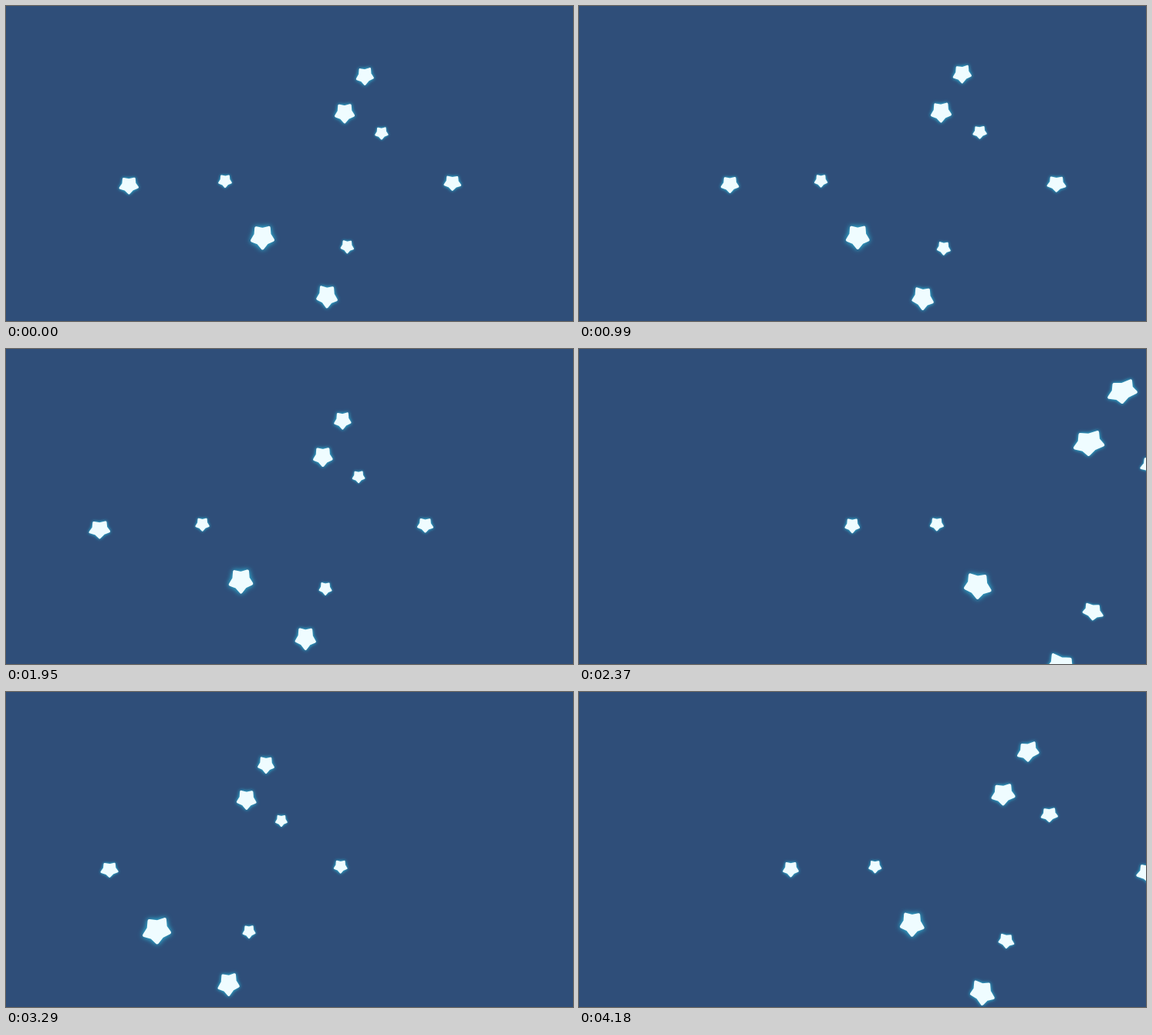
Write an HTML page with a canvas that moves like this. It is 735 by 409 pixels and loops after 4930 ms.

```html
<!DOCTYPE html>
<html lang="en">
<head>
<meta charset="utf-8">
<title>Star panorama</title>
<style>
  html, body { margin: 0; width: 100%; height: 100%; overflow: hidden; background: #2f4e79; }
  canvas { display: block; }
</style>
</head>
<body>
<canvas id="sky" width="735" height="409"></canvas>
<script>
const ctx = document.getElementById('sky').getContext('2d');
const W = 735, H = 409, CX = 366.5, CY = 204.5, FOCAL = 366;
const LOOP = 4930, STEP = 75, RAD = Math.PI / 180;

// Stars fixed on a sphere: longitude (deg), tangent of latitude (down is positive), radius
const stars = [
  [7.4, -0.3, 10.9], [3.5, -0.176, 13], [10.5, -0.103, 8.2],
  [22.4, 0.059, 9], [-37.2, 0.067, 10.2], [-20.4, 0.06, 8.8],
  [-13, 0.259, 15.6], [4, 0.288, 8.4], [0, 0.466, 13]
];

// Key points of the camera sweep: time (ms), yaw (deg)
const sweep = [
  [0, 7.7], [510, 12.8], [600, 16.4], [760, 21.3], [1330, -15.5],
  [1470, -21.3], [1620, -21.3], [1950, 3.4], [2400, 37], [2810, 10],
  [3200, -5], [3290, -12], [3410, -16.2], [3650, -16.2], [4180, 23.1]
];
const last = sweep.length - 1;

const slope = i => (sweep[i + 1][1] - sweep[i][1]) / (sweep[i + 1][0] - sweep[i][0]);

// Harmonic mean of the neighbouring slopes; flat at the start and at turning points
function tangent(i) {
  if (i === 0) return 0;
  if (i === last) return slope(i - 1);
  const a = slope(i - 1), b = slope(i);
  return a * b <= 0 ? 0 : 2 * a * b / (a + b);
}

// Smooth curve through the key points, sampled in even steps between them
function yawAt(t) {
  const i = Math.min(sweep.findLastIndex(key => key[0] <= t), last - 1);
  const [t0, y0] = sweep[i], [t1, y1] = sweep[i + 1];
  const d = t1 - t0, n = Math.round(d / STEP);
  const u = Math.min(1, Math.floor((t - t0) / d * n) / n), v = 1 - u;
  return v * v * ((1 + 2 * u) * y0 + u * d * tangent(i)) +
         u * u * ((3 - 2 * u) * y1 - v * d * tangent(i + 1));
}

// A star lying flat on the sphere, seen in perspective
function starPath(lon, lat, radius) {
  const sl = Math.sin(lon), cl = Math.cos(lon), sp = Math.sin(lat), cp = Math.cos(lat);
  const path = new Path2D();
  for (let k = 0; k < 10; k++) {
    const r = radius / FOCAL * (k % 2 ? 0.58 : 0.87), angle = k * Math.PI / 5;
    const e = r * Math.sin(angle), d = r * Math.cos(angle);
    const x = sl * cp + e * cl - d * sl * sp;
    const y = sp + d * cp;
    const z = cl * cp - e * sl - d * cl * sp;
    path.lineTo(CX + FOCAL * x / z, CY + FOCAL * y / z);
  }
  path.closePath();
  return path;
}

function drawStar(lon, lat, radius) {
  const path = starPath(lon, lat, radius);
  ctx.lineWidth = radius * 0.26 / Math.cos(lon);
  ctx.shadowBlur = radius * 0.45;
  ctx.fill(path);
  ctx.stroke(path);
  ctx.shadowBlur = 0;
  ctx.fill(path);
}

function draw(t) {
  const yaw = yawAt(t);
  ctx.fillStyle = '#2f4e79';
  ctx.fillRect(0, 0, W, H);
  ctx.fillStyle = ctx.strokeStyle = '#effcff';
  ctx.shadowColor = '#2fc0e2';
  ctx.lineJoin = 'round';
  for (const [a, v, r] of stars) {
    const lon = (yaw + a) * RAD;
    if (Math.abs(lon) < 1.1) drawStar(lon, Math.atan(v), r);
  }
}

function frame(now) {
  draw(now % LOOP);
  requestAnimationFrame(frame);
}
draw(0);
requestAnimationFrame(frame);
</script>
</body>
</html>
```
